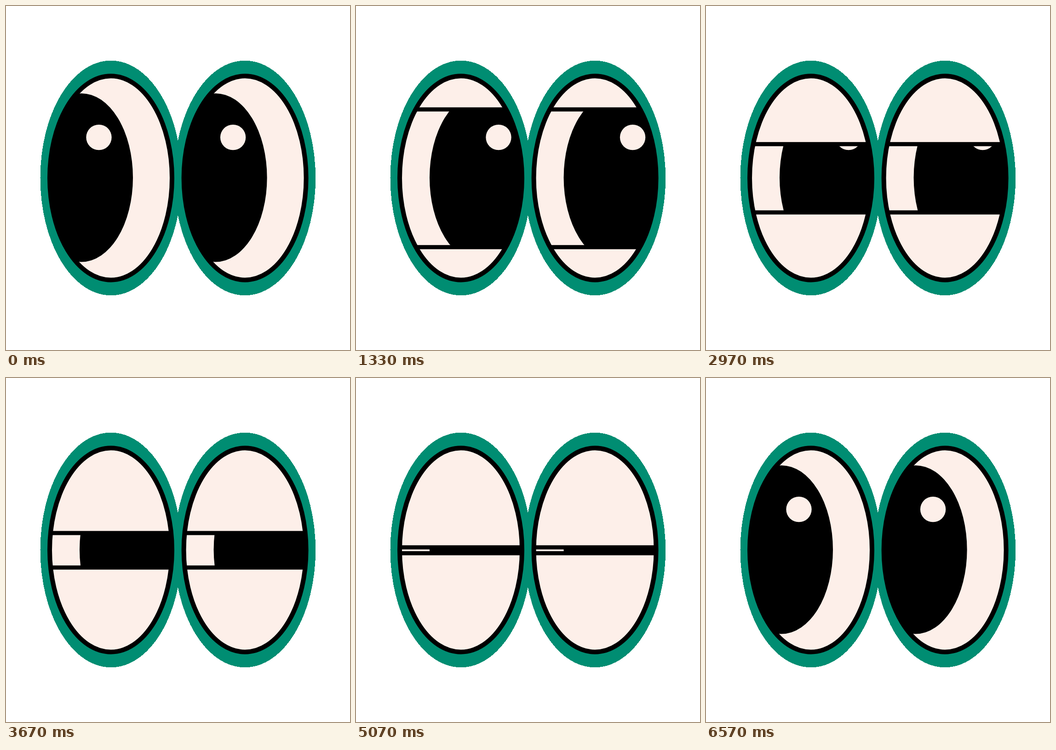
An HTML page for the animation above (6610 ms loop, 748 by 748 pixels).

```html
<!DOCTYPE html>
<html lang="en">
<head>
<meta charset="utf-8">
<title>Blinking eyes</title>
<style>
  html, body { margin: 0; width: 100%; height: 100%; overflow: hidden; background: #fff; }
  svg { display: block; width: 100%; height: 100%; }
</style>
</head>
<body>
<svg viewBox="0 0 748 748">
  <defs>
    <clipPath id="ball"><ellipse cx="228" cy="374" rx="133" ry="221.7"/></clipPath>
    <g id="eye">
      <g clip-path="url(#ball)">
        <rect x="90" y="147" width="276" height="454" fill="#fdefe9"/>
        <g id="pupil">
          <ellipse cx="164" cy="373.2" rx="112" ry="183.3"/>
          <circle cx="202" cy="285.6" r="27.7" fill="#fdefe9"/>
        </g>
        <g fill="#fdefe9" stroke="#000" stroke-width="9">
          <rect id="upper" x="60" y="-125.4" width="336" height="500"/>
          <rect id="lower" x="60" y="374.6" width="336" height="500"/>
        </g>
      </g>
      <ellipse cx="228" cy="374" rx="133" ry="221.7" fill="none" stroke="#000" stroke-width="10"/>
    </g>
  </defs>
  <g fill="#008d72" shape-rendering="crispEdges">
    <ellipse cx="228.2" cy="374" rx="153.7" ry="255.3"/>
    <ellipse cx="519.5" cy="374" rx="153.7" ry="255.3"/>
  </g>
  <use href="#eye"/>
  <use href="#eye" x="291.6"/>
</svg>
<script>
const LOOP = 6610, FPS = 30;
const CYCLE = 66, HALF = 36;   // frames per look left and right; the right look lags by HALF
const GAP = 240, SHIFT = 108;  // lid travel and pupil travel in pixels

const get = id => document.getElementById(id);
const pupil = get('pupil'), upper = get('upper'), lower = get('lower');

// Smooth 0 to 1 between frames a and b
function ease(f, a, b) {
  const u = Math.min(1, Math.max(0, (f - a) / (b - a)));
  return u * u * (3 - 2 * u);
}

const shut = f => 1 - ease(f, -1, 11);

function lidOpening(f) {
  if (f < 15) return shut(f);
  if (f < 34) return ease(f, 18.93, 29.93);
  if (f < 51) return shut(f - HALF);
  return ease(f, 54.93, 65.93);
}

function draw(ms) {
  const f = Math.floor(ms * FPS / 1000 + 0.15) % CYCLE;
  const gap = GAP * lidOpening(f);
  const look = ease(f, 11, 19) - ease(f, 11 + HALF, 19 + HALF);
  pupil.setAttribute('transform', `translate(${SHIFT * look})`);
  upper.setAttribute('transform', `translate(0 ${-gap})`);
  lower.setAttribute('transform', `translate(0 ${gap})`);
}

const start = performance.now();
function tick() {
  draw((performance.now() - start) % LOOP);
  requestAnimationFrame(tick);
}
tick();
</script>
</body>
</html>
```
